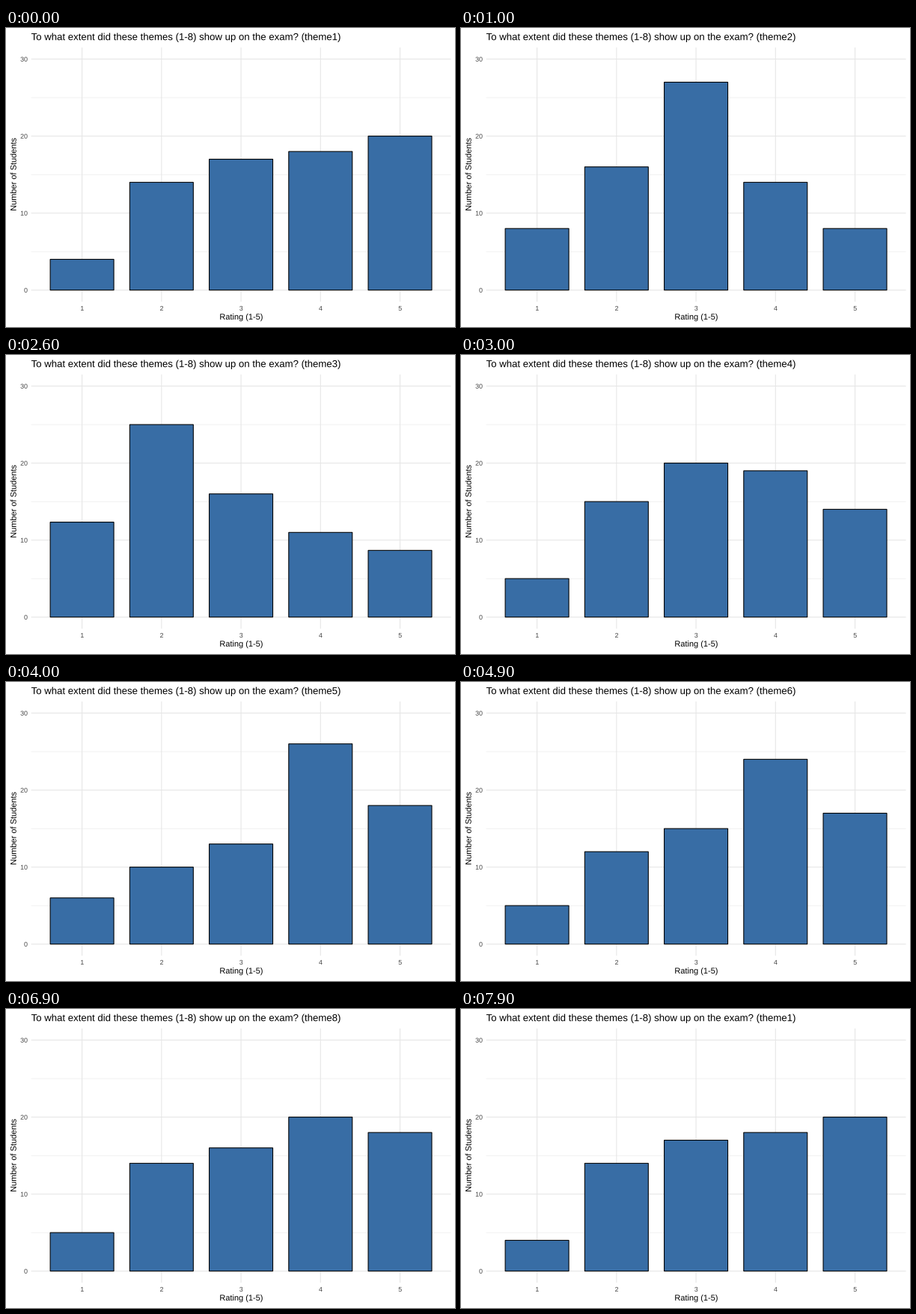
A matplotlib script for the animation above (8000 ms loop, 600 by 400 pixels).

```python
import math

import matplotlib.pyplot as plt
import numpy as np
from matplotlib.animation import FuncAnimation
from matplotlib.patches import PathPatch
from matplotlib.textpath import TextPath
from matplotlib.transforms import Affine2D

plt.rcParams["font.family"] = "Liberation Sans"

W, H, DPI = 600, 400, 100
PT = 72 / DPI  # points per pixel
LEFT, RIGHT, TOP, BOTTOM = 33.6, 594.5, 26.1, 366.1
X_UNIT = (RIGHT - LEFT) / 5.28
Y_UNIT = (BOTTOM - TOP) / 33
LINE = 1.07
BLUE, GRID, TICK = "#386da5", "#e6e6e6", "#444444"
QUESTION = "To what extent did these themes (1-8) show up on the exam?"

FRAMES = 80
PERIOD = 9.9  # frames from one theme to the next
STEPS = 6     # frames a change takes
TITLE_DELAY = 4

# Answers rating each theme 1 to 4; the rest of the class rated it 5
STUDENTS = 73
ANSWERS = [
    (4, 14, 17, 18), (8, 16, 27, 14), (16, 30, 14, 7), (5, 15, 20, 19),
    (6, 10, 13, 26), (5, 12, 15, 24), (8, 13, 13, 22), (5, 14, 16, 20),
]
THEMES = [np.array([*row, STUDENTS - sum(row)]) for row in ANSWERS]


def px(rating):
    return LEFT + (rating - 0.36) * X_UNIT


def py(count):
    return BOTTOM - (count + 1.5) * Y_UNIT


def text_path(x, y, text, size, align=0.0, angle=0):
    """Outline of text; align 0, 0.5 or 1 puts its left, middle or right at x."""
    path = TextPath((0, 0), text, size=size)
    shift = align * path.get_extents().x1
    place = (Affine2D().translate(-shift, 0).scale(1, -1)
             .rotate_deg(-angle).translate(x, y))
    return place.transform_path(path)


def label(*args, color="black", **kw):
    patch = PathPatch(text_path(*args, **kw), facecolor=color, linewidth=0,
                      snap=False, zorder=3)
    return ax.add_patch(patch)


def state(frame):
    """Bar heights and the theme number named in the title."""
    for i, counts in enumerate(THEMES):
        end = math.floor(10.35 + PERIOD * i)
        if frame < end:
            nxt = (i + 1) % len(THEMES)
            steps = STEPS if i else STEPS + 1  # the opening change is longer
            step = max(0, frame - end + steps)
            heights = counts + (THEMES[nxt] - counts) * step / steps
            return heights, (nxt if step >= TITLE_DELAY else i) + 1
    return THEMES[0], 1


fig = plt.figure(figsize=(W / DPI, H / DPI), dpi=DPI, facecolor="white")
ax = fig.add_axes([0, 0, 1, 1])
ax.axis("off")

ratings = np.arange(1, 6)
tens = np.arange(0, 31, 10)
grid = dict(colors=GRID, snap=False, zorder=1)
ax.hlines(py(tens[:-1] + 5), LEFT, RIGHT, lw=LINE / 2 * PT, **grid)
ax.hlines(py(tens), LEFT, RIGHT, lw=LINE * PT, **grid)
ax.vlines(px(ratings), TOP, BOTTOM, lw=LINE * PT, **grid)

bars = ax.bar(px(ratings), 0, width=0.8 * X_UNIT, bottom=py(0), color=BLUE,
              edgecolor="black", linewidth=LINE * PT, snap=False, zorder=2)

for r in ratings:
    label(px(r), 378, str(r), 8.8, align=0.5, color=TICK)
for v in tens:
    label(LEFT - 5, py(v) + 3.2, str(v), 8.8, align=1, color=TICK)
label((LEFT + RIGHT) / 2, 390, "Rating (1-5)", 11, align=0.5)
label(13.6, (TOP + BOTTOM) / 2, "Number of Students", 11, align=0.5, angle=90)
title = label(LEFT, 16.2, QUESTION, 13.2)

ax.set_xlim(0, W)
ax.set_ylim(H, 0)


def draw(frame):
    heights, theme = state(frame)
    for bar, h in zip(bars, heights):
        bar.set_height(-h * Y_UNIT)
    title.set_path(text_path(LEFT, 16.2, f"{QUESTION} (theme{theme})", 13.2))
    return [*bars, title]


anim = FuncAnimation(fig, draw, frames=FRAMES, interval=100, repeat=True,
                     repeat_delay=0)
plt.show()
```
